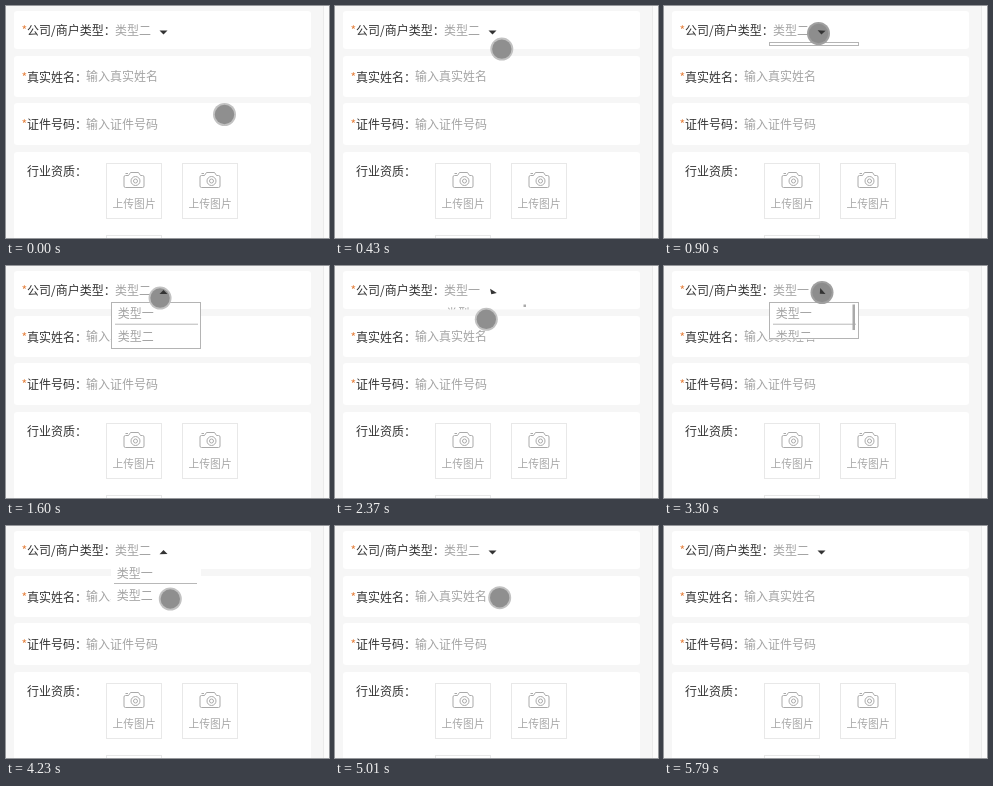
Write an HTML page that moves like this. It is 323 by 232 pixels and loops after 7110 ms.

```html
<!DOCTYPE html>
<html lang="zh-CN">
<head>
<meta charset="utf-8">
<title>下拉选择</title>
<style>
  html, body { margin: 0; width: 100%; height: 100%; overflow: hidden; background: #f6f6f6; }
  svg { display: block; width: 100vw; height: 100vh; }
  text { font: 12px "Noto Sans CJK SC", "Noto Sans CJK", sans-serif; fill: #333; }
  .hint { fill: #a4a4a4; }
  .star { fill: #e5813e; }
  .card { fill: #fff; }
  .tile { fill: #fff; stroke: #e8e8e8; }
  .caption { font-size: 10.8px; fill: #a8a8a8; }
  .icon { fill: none; stroke: #aaa; }
</style>
</head>
<body>
<svg viewBox="0 0 323 232" preserveAspectRatio="none">
  <defs>
    <clipPath id="reveal"><rect id="window" x="105" y="36" width="90" height="0"/></clipPath>
    <g id="upload">
      <rect class="tile" x=".5" y=".5" width="55" height="55"/>
      <g class="icon">
        <path d="M19.5 12.5h3l2-3h8l2 3h2q1.5 0 1.5 1.5v9q0 1.5-1.5 1.5h-17q-1.5 0-1.5-1.5v-9q0-1.5 1.5-1.5z"/>
        <circle cx="29.5" cy="18" r="4.5"/>
        <circle cx="29.5" cy="18" r="2"/>
        <path d="M19.5 10.5h2.500"/>
      </g>
      <text class="caption" x="6.5" y="45">上传图片</text>
    </g>
  </defs>

  <rect width="323" height="232" fill="#f6f6f6"/>
  <rect x="317" width="1" height="232" fill="#ebebeb"/>
  <rect x="318" width="5" height="232" fill="#fbfbfb"/>
  <g class="card">
    <rect x="8" y="5" width="297" height="38" rx="3"/>
    <rect x="8" y="50" width="297" height="41" rx="3"/>
    <rect x="8" y="97" width="297" height="42" rx="3"/>
    <rect x="8" y="146" width="297" height="96" rx="3"/>
  </g>

  <text class="star" x="15.5" y="29">*</text>
  <text x="21" y="29">公司/商户类型：</text>
  <text class="hint" id="value" x="109" y="29">类型二</text>
  <text class="star" x="15.5" y="76">*</text>
  <text x="21" y="76">真实姓名：</text>
  <text class="hint" x="80" y="75">输入真实姓名</text>
  <text class="star" x="15.5" y="123">*</text>
  <text x="21" y="123">证件号码：</text>
  <text class="hint" x="80" y="122.5">输入证件号码</text>
  <text x="21" y="170">行业资质：</text>
  <use href="#upload" x="100" y="157"/>
  <use href="#upload" x="176" y="157"/>
  <use href="#upload" x="100" y="229"/>

  <g id="menu">
    <g clip-path="url(#reveal)">
      <rect x="105" y="36" width="90" height="60" fill="#fff"/>
      <g id="options">
        <text class="hint" x="110.7" y="51.5">类型一</text>
        <rect x="108" y="57" width="83" height="1" fill="#b8b8b8"/>
        <text class="hint" x="110.7" y="74">类型二</text>
      </g>
      <rect id="thumb" x="188.5" y="38.5" width="2.5" height="0" fill="#aaa"/>
    </g>
    <rect id="outline" x="105.5" y="36.5" width="89" height="0" fill="none" stroke="#b4b4b4"/>
  </g>

  <g id="pointer">
    <circle id="ring" r="11.5"/>
    <circle r="9.7" fill="#8c8c8c" fill-opacity=".95"/>
  </g>
  <path id="arrow" d="M153.5 24.5h8l-4 4z" fill="#333"/>
</svg>

<script>
const LOOP = 7110, FULL = 47, OPENING = 400, CLOSING = 300;
const TURN_OPEN = 540, TURN_CLOSE = 270;
const sessions = [{ open: 822, close: 2150 }, { open: 3020, close: 4230 }];

// Pointer stops: time in ms, x, y
const stops = [
  [0, 218.5, 108.5], [40, 218.5, 108.5], [590, 154.5, 27.5],
  [1540, 154.5, 27.5], [1760, 152, 53], [1960, 152, 53], [1990, 151.3, 53.3],
  [2480, 151.3, 53.3], [2840, 158, 26.5], [3420, 158, 26.5],
  [3680, 165, 65], [3760, 165, 73], [4050, 165, 73], [4080, 164.3, 73],
  [4860, 164.3, 73], [5010, 164.7, 71.7], [5260, 164.7, 71.7],
  [5790, 282, 252], [LOOP, 282, 252]
];

const $ = id => document.getElementById(id);
const clamp = v => Math.max(0, Math.min(1, v));
const swing = v => 0.5 - Math.cos(Math.PI * clamp(v)) / 2;

function pointerAt(t) {
  const i = stops.findIndex(s => s[0] > t);
  const [t0, x0, y0] = stops[i - 1], [t1, x1, y1] = stops[i];
  const k = swing((t - t0) / (t1 - t0));
  return [x0 + (x1 - x0) * k, y0 + (y1 - y0) * k];
}

function draw(t) {
  const s = sessions.find(s => t >= s.open && t < s.close + CLOSING);
  let height = 0, turn = 0, closing = false;
  if (s) {
    closing = t >= s.close;
    const since = t - (closing ? s.close : s.open);
    height = FULL * (closing ? 1 - swing(since / CLOSING) : swing(since / OPENING));
    turn = closing ? 1 - clamp(since / TURN_CLOSE) : clamp(since / TURN_OPEN) ** 2;
  }
  const moving = height > 6 && height < FULL - 0.5;
  const pressed = sessions.some(s => t >= s.open - 60 && t < s.open + OPENING);

  $("value").textContent = t >= 2150 && t < 4230 ? "类型一" : "类型二";
  $("arrow").setAttribute("transform", `rotate(${180 * turn} 157.5 26.3)`);
  $("menu").setAttribute("visibility", height > 0.5 ? "visible" : "hidden");
  $("window").setAttribute("height", height);
  $("options").setAttribute("transform", closing ? "" : "translate(1 .7)");
  $("thumb").setAttribute("height", moving ? Math.max(2.5, height * height / 55) : 0);
  $("outline").setAttribute("height", Math.max(0, Math.round(height) - 1));
  $("outline").setAttribute("stroke-opacity", closing ? 0 : 1);
  $("ring").setAttribute("fill", pressed ? "#a0a0a0" : "#c2c2c2");
  $("pointer").setAttribute("transform", `translate(${pointerAt(t)})`);
}

const start = performance.now();
function tick(now) {
  draw(Math.max(0, now - start) % LOOP);
  requestAnimationFrame(tick);
}
draw(0);
requestAnimationFrame(tick);
</script>
</body>
</html>
```
